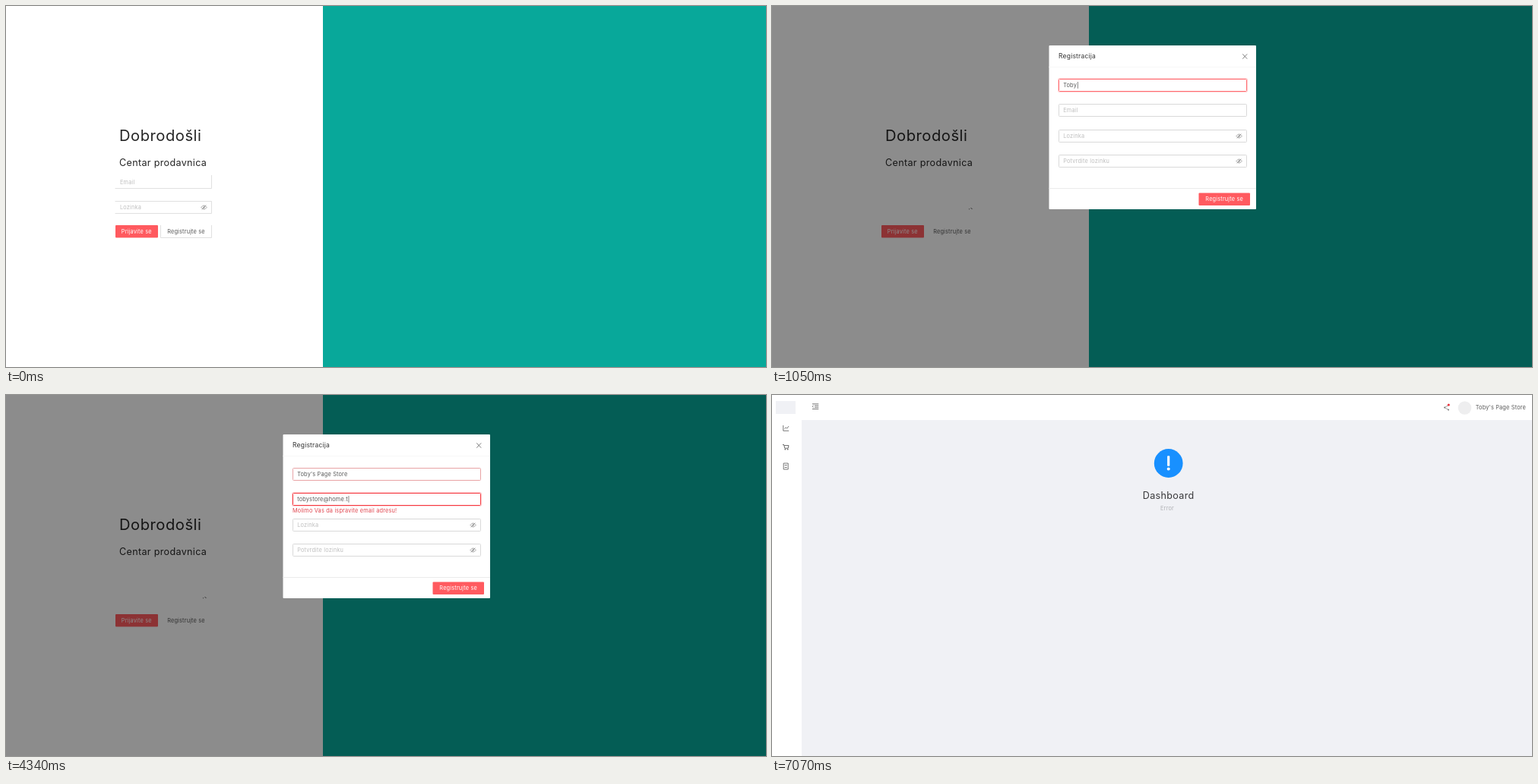
An HTML page for the animation above (7.28 s loop, 1000x476 px).

```html
<!DOCTYPE html>
<html lang="sr">
<head>
<meta charset="utf-8">
<title>Registracija</title>
<style>
  html, body { margin: 0; width: 100%; height: 100%; overflow: hidden; background: #fff; }
  svg { display: block; width: 100vw; height: 100vh; }
  text { font-family: Inter, sans-serif; letter-spacing: .025em; white-space: pre; }
</style>
</head>
<body>
<svg id="stage" viewBox="0 0 1000 476" preserveAspectRatio="none"></svg>
<script>
const LOOP = 7280, TICK = 70;
const RED = '#ff5a5f', INK = '#262626', BODY = '#595959', HINT = '#bfbfbf', LINE = '#d9d9d9';
const SHOP = "Toby's Page Store", MAIL = 'tobystore@home.test';

// Keystroke times in ms, one per character
const shopKeys = [770, 910, 980, 1050, 1190, 1400, 1610, 1610, 1750, 1890, 1890, 2030, 2100, 2240, 2310, 2310, 2380];
const mailKeys = [2800, 2870, 2940, 2940, 3010, 3080, 3150, 3220, 3500,
  3710, 3780, 3850, 3990, 4130, 4340, 4340, 4410, 4410, 4480];
const passKeys = [4760, 4830, 4900, 4970, 5040, 5180, 5250, 5250, 5320, 5390];
const confirmKeys = passKeys.map(k => k + 910);

const clamp = v => Math.max(0, Math.min(1, v));

function bezier(x1, y1, x2, y2, x) {
  const at = (a, b, u) => 3 * (1 - u) ** 2 * u * a + 3 * (1 - u) * u * u * b + u ** 3;
  let lo = 0, hi = 1;
  for (let i = 0; i < 24; i++) {
    const mid = (lo + hi) / 2;
    if (at(x1, x2, mid) < x) lo = mid; else hi = mid;
  }
  return at(y1, y2, lo);
}

const rect = (x, y, w, h, fill, extra = '') =>
  `<rect x="${x}" y="${y}" width="${w}" height="${h}" fill="${fill}" ${extra}/>`;
const label = (x, y, str, size = 7.34, fill = BODY, extra = '') =>
  `<text x="${x}" y="${y}" font-size="${size}" fill="${fill}" ${extra}>${str}</text>`;
const stroke = (d, color, width = .8, extra = '') =>
  `<path d="${d}" fill="none" stroke="${color}" stroke-width="${width}" ${extra}/>`;
const middle = 'text-anchor="middle"';

const eye = (x, y) => `<g transform="translate(${x} ${y})">` +
  stroke('M-3.6 0Q0-5 3.6 0Q0 5-3.6 0ZM-2.8 2.9L2.8-2.9', '#777', .65) +
  '<circle r="1" fill="#777"/></g>';

function login(masked, late) {
  let s = rect(0, 0, 1000, 476, '#fff') + rect(417, 0, 583, 476, '#08a89a') +
    label(149, 178.4, 'Dobrodošli', 20.2, INK) +
    label(149, 211.3, 'Centar prodavnica', 12.6, INK) +
    rect(144, 289, 56, 16.5, RED, 'rx="1"') +
    label(171.8, 299.8, 'Prijavite se', 7.34, '#fff', middle) +
    label(237, 299.8, 'Registrujte se', 7.34, BODY, middle);
  if (!masked) s += stroke('M270.5 223V240.5H143.5M143.5 257.5H270.5V273.5H143.5M203.5 289V305.5H270.5V289', LINE);
  if (!masked || late)
    s += label(150, 234.8, 'Email', 7.34, HINT) + label(150, 268.3, 'Lozinka', 7.34, HINT) + eye(260.5, 265.5);
  else s += stroke('M259 267.5l1 .5M261.5 266l2 2', '#333');
  return s;
}

function field(i, hint, value, { focus, hover, error, secret }) {
  const y = Math.floor(96.2 + i * 33.45) + .5, base = y + 10.4;
  const border = focus ? (error ? '#f5383f' : '#ff6b6f') : hover ? '#e8a3a5' : LINE;
  let s = focus ? rect(376.5, y - 1, 249, 18, 'none', 'rx="1.5" stroke="#ff5a5f" stroke-opacity=".25"') : '';
  s += rect(377.5, y, 247, 16, '#fff', `rx="1" stroke="${border}"`);
  if (secret) {
    s += eye(614.6, y + 8);
    const end = 383.2 + 2.25 * value;
    if (value) s += stroke(`M384 ${y + 8}H${end}`, BODY, 1.2, 'stroke-linecap="round" stroke-dasharray="0 2.25"');
    if (focus) s += stroke(`M${end + .2} ${y + 3.6}v8.8`, INK, .7);
  } else if (value || focus) {
    s += label(383.2, base, value + (focus ? `<tspan fill="${INK}">|</tspan>` : ''));
  }
  return value ? s : s + label(383.2, base, hint, 7.34, HINT);
}

function modal(t) {
  const count = keys => keys.filter(k => k <= t).length;
  const focused = t < 420 ? -1 : t < 2520 ? 0 : t < 4620 ? 1 : t < 5530 ? 2 : t < 6720 ? 3 : -1;
  const error = t >= 2870 && t < 4410;
  const state = (i, more) => ({
    focus: focused === i,
    hover: i === 0 ? t >= 2520 && t < 6510 : i === 3 && t >= 6510,
    ...more
  });
  const hot = t >= 6720;
  return rect(364.5, 52, 272.5, 216, '#fff', 'rx="1"') +
    label(377, 69, 'Registracija', 8.5, '#333') +
    stroke('M619.2 63.3l6 6.4M625.2 63.3l-6 6.4', '#707070', .9) +
    stroke('M364.5 80.5H637', '#f8f8f8', 1) + stroke('M364.5 240.5H637', '#ebebeb', 1) +
    field(0, 'Naziv radnje', SHOP.slice(0, count(shopKeys)), state(0)) +
    field(1, 'Email', MAIL.slice(0, count(mailKeys)), state(1, { error })) +
    (error ? label(377, 155.1, 'Molimo Vas da ispravite email adresu!', 7.34, '#e0464f') : '') +
    field(2, 'Lozinka', count(passKeys), state(2, { secret: true })) +
    field(3, 'Potvrdite lozinku', count(confirmKeys), state(3, { secret: true })) +
    rect(561.5, 246.5, 67.5, 16.5, hot ? '#ff8083' : RED, 'rx="1"') +
    label(595.2, 257.4, 'Registrujte se', 7.34, '#fff', middle);
}

function dashboard() {
  return rect(0, 0, 1000, 476, '#fff') + rect(39, 33, 961, 443, '#f0f1f5') +
    rect(5, 8, 26, 17, '#f0f1f5') +
    stroke('M14.8 40v7.2h7.4M16.5 44.5l1.7-1.7 1.5 1.3 2.3-3', '#555') +
    stroke('M14 65.5h1.6l1.2 4.7h4.4l.8-3.6h-5.8', '#444') +
    '<circle cx="17.3" cy="71.8" r=".8" fill="#444"/><circle cx="20.8" cy="71.8" r=".8" fill="#444"/>' +
    stroke('M15.2 90h6v8h-6zM16.7 92.5h3M16.7 95.5h3', '#555') +
    stroke('M53 11.8h8.3M56 14h5.3M56 16.2h5.3M53 18.4h8.3M54.6 13.8l-1.4 1.3 1.4 1.3', '#555') +
    stroke('M890 13.5l-5 3 5 3', '#777', .7) +
    '<circle cx="885" cy="16.5" r="1" fill="#777"/><circle cx="890" cy="19.5" r="1" fill="#777"/>' +
    '<circle cx="890.3" cy="13" r="1.6" fill="#e8323c"/><circle cx="911.5" cy="17" r="8.8" fill="#eeeeef"/>' +
    label(992, 19.4, SHOP, 7.34, BODY, 'text-anchor="end"') +
    '<circle cx="521.7" cy="90" r="18.9" fill="#1890ff"/>' +
    rect(520.1, 80.3, 3.2, 13.4, '#fff', 'rx=".8"') + '<circle cx="521.7" cy="97.6" r="2" fill="#fff"/>' +
    label(521.7, 137, 'Dashboard', 12.6, '#3a3a3c', middle) +
    label(520, 152, 'Error', 7.34, '#b0b1b5', middle);
}

function scene(t) {
  if (t >= 6930) return dashboard();
  if (t < TICK) return login(false);
  const age = t - 43;
  const grow = t < 280 ? bezier(.08, .82, .17, 1, clamp(age / 300)) : 1;
  const scale = .2 + .8 * grow;
  return login(true, t >= 6720) +
    rect(0, 0, 1000, 476, '#000', `opacity="${.45 * clamp(age / 200)}"`) +
    `<g opacity="${grow}" transform="translate(237 297) scale(${scale}) translate(-237 -297)">${modal(t)}</g>`;
}

const stage = document.getElementById('stage');
let shown = -1;
function draw() {
  const t = Math.floor(performance.now() % LOOP / TICK) * TICK;
  if (t !== shown) stage.innerHTML = scene(shown = t);
  requestAnimationFrame(draw);
}
draw();
</script>
</body>
</html>
```
